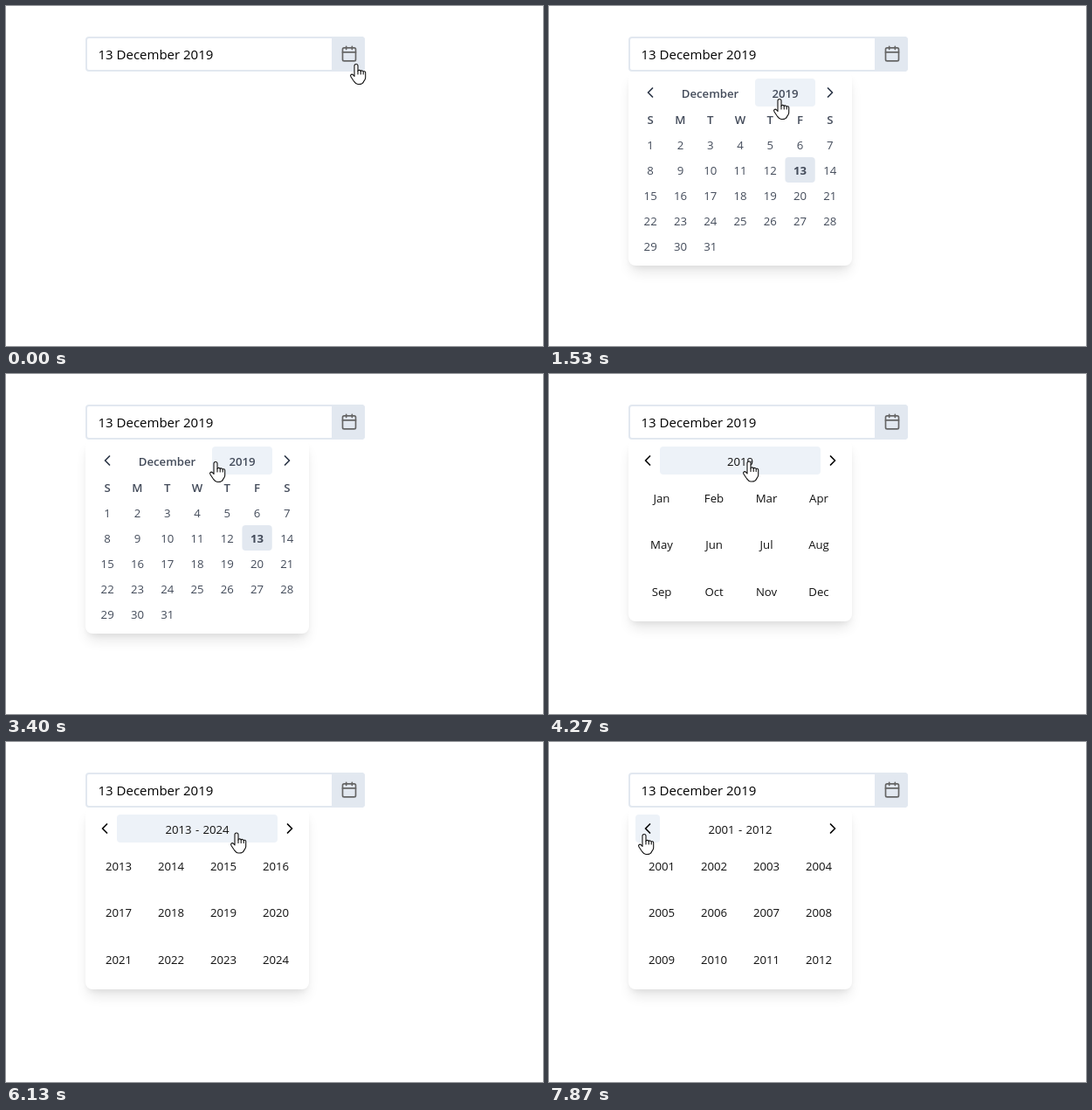
Write an HTML page that moves like this. It is 615 by 389 pixels and loops after 8 s.

```html
<!DOCTYPE html>
<html lang="en">
<head>
<meta charset="utf-8">
<title>Date picker</title>
<style>
html, body { margin: 0; width: 100%; height: 100%; overflow: hidden; background: #fff; }
svg { display: block; font-family: "Open Sans", "Noto Sans", sans-serif; }
.far { filter: blur(7.5px); opacity: .1; }
.near { filter: blur(3px); opacity: .05; }
.line { fill: none; stroke-linecap: round; stroke-linejoin: round; }
</style>
</head>
<body>
<svg width="615" height="389" viewBox="0 0 615 389">
  <g id="popup"></g>
  <rect x="92" y="36" width="318" height="38" rx="3" fill="#fff" stroke="#e2e8f0" stroke-width="2"/>
  <path d="M373 35H407a4 4 0 0 1 4 4V71a4 4 0 0 1-4 4H373Z" fill="#e2e8f0"/>
  <text x="105.5" y="61" font-size="15" fill="#000">13 December 2019</text>
  <g class="line" transform="translate(383 44.6) scale(.8333)" stroke="#666" stroke-width="2">
    <rect x="3" y="4" width="18" height="18" rx="2"/>
    <path d="M16 2v4M8 2v4M3 10h18"/>
  </g>
  <g id="cursor" stroke="#111" stroke-width="1.1" stroke-linejoin="round" stroke-linecap="round">
    <path fill="#fff" d="M-2 2.5a2 2 0 0 1 4 0V8.5c0-1.5 3-1.5 3.2.3c.3-1.3 2.8-1.2 3 .5c.6-1 2.5-.7 2.5 1V16c0 2.5-2 3.5-2.3 5C7.5 22.8 6 23.5 3.5 23.5H2C-.5 23.5-1.5 21.5-3 19.5L-6 15c-1.4-2.2 1-3.8 2.6-2.2L-2 14.5Z"/>
    <path fill="none" d="M2 8.5V12M5.2 9V12M8.2 9.5V12"/>
  </g>
</svg>
<script>
const FPS = 15, LOOP = 8000;
const popup = document.getElementById('popup');
const cursor = document.getElementById('cursor');

// Pointer tip: [tick, x, y]
const path = [
  [0, 401, 66], [14, 401, 66], [18, 372, 72], [23, 264, 106], [27, 150, 119],
  [31, 103, 156], [35, 235, 104], [37, 269, 103], [49, 269, 103], [51, 240, 100],
  [53, 240, 100], [55, 229, 99.5], [66, 229, 99.5], [71, 264, 100], [72, 264, 100],
  [74, 264, 103.5], [95, 264, 103.5], [99, 205, 128], [103, 123.5, 177],
  [108, 108, 107], [109, 109, 105], [120, 109, 105]
];

function pointer(tick) {
  const i = path.findIndex((p, n) => n && tick <= p[0]);
  const [t0, x0, y0] = path[i - 1], [t1, x1, y1] = path[i];
  const k = (tick - t0) / (t1 - t0);
  return [x0 + (x1 - x0) * k, y0 + (y1 - y0) * k];
}

const label = (x, y, text, color, weight = 400) =>
  `<text x="${x}" y="${y}" font-size="13.2" word-spacing=".9" text-anchor="middle" fill="${color}" font-weight="${weight}">${text}</text>`;

const chevron = (x, dir, color) =>
  `<path class="line" d="M${x - dir * 2.5} 94l${dir * 5} 5l${-dir * 5} 5" stroke="${color}" stroke-width="1.75"/>`;

// White card with a wide and a tight shadow, each inset and shifted down
function panel(h) {
  const box = (inset, dy, attrs) =>
    `<rect x="${91 + inset}" y="${75 + inset + dy}" width="${256 - 2 * inset}" height="${h - 2 * inset}" rx="${8 - inset}" ${attrs}/>`;
  return box(3, 10, 'class="far"') + box(2, 4, 'class="near"') + box(0, 0, 'fill="#fff"');
}

// A button with a hover background behind its content
function button(mouse, x, y, w, h, content, fill) {
  const over = mouse[0] >= x && mouse[0] < x + w && mouse[1] >= y && mouse[1] < y + h;
  const bg = fill || (over && '#edf2f8');
  return (bg ? `<rect x="${x}" y="${y}" width="${w}" height="${h}" rx="4" fill="${bg}"/>` : '') + content;
}

function dayView(mouse) {
  const ink = '#434b5a', dark = '#2d3748', col = 240 / 7;
  const header = (x, w, content) => button(mouse, x, 83, w, 32, content);
  let out = panel(222)
    + header(99, 34, chevron(116, -1, dark))
    + header(133, 103, label(184.5, 105, 'December', ink, 600))
    + header(236, 69, label(270.5, 105, '2019', ink, 600))
    + header(305, 34, chevron(322, 1, dark));
  [...'SMTWTFS'].forEach((d, i) => out += label(99 + col * (i + .5), 135, d, ink, 600));
  for (let d = 1; d <= 31; d++) {
    const x = 99 + col * ((d - 1) % 7), y = 144 + 29 * Math.floor((d - 1) / 7);
    const today = d === 13;
    out += button(mouse, x, y, col, 29,
      label(x + col / 2, y + 20, d, ink, today ? 700 : 400), today && '#e2e8f0');
  }
  return out;
}

function gridView(mouse, title, items) {
  const ink = '#111';
  return panel(208)
    + button(mouse, 99, 83, 28, 32, chevron(113, -1, '#000'))
    + button(mouse, 127, 83, 184, 32, label(219, 105, title, ink))
    + button(mouse, 311, 83, 28, 32, chevron(325, 1, '#000'))
    + items.map((item, i) => {
      const x = 99 + 60 * (i % 4), y = 115 + 53.4 * Math.floor(i / 4);
      return button(mouse, x, y, 60, 53.4, label(x + 30, Math.round(y + 31.8), item, ink));
    }).join('');
}

const months = 'Jan Feb Mar Apr May Jun Jul Aug Sep Oct Nov Dec'.split(' ');
const yearView = (mouse, first) =>
  gridView(mouse, `${first} - ${first + 11}`, months.map((_, i) => first + i));

function view(tick, mouse) {
  if (tick < 10) return '';
  if (tick < 64) return dayView(mouse);
  if (tick < 92) return gridView(mouse, '2019', months);
  return yearView(mouse, tick < 118 ? 2013 : 2001);
}

let last = -1;
const start = performance.now();
function draw(now) {
  const time = Math.max(0, now - start) % LOOP;
  // Small offset absorbs rounding at tick edges
  const tick = Math.min(119, Math.floor((time + 4) * FPS / 1000));
  if (tick !== last) {
    last = tick;
    const mouse = pointer(tick);
    popup.innerHTML = view(tick, mouse);
    cursor.setAttribute('transform', `translate(${mouse})`);
  }
  requestAnimationFrame(draw);
}
draw(start);
</script>
</body>
</html>
```
